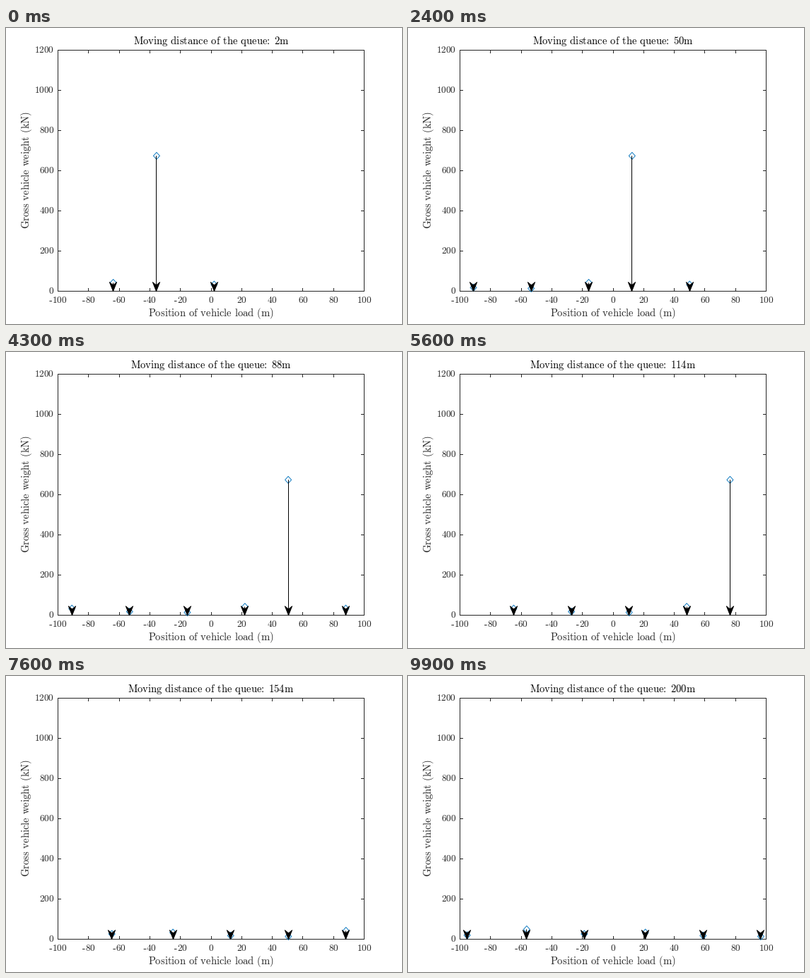
Animation of 560 by 420 pixels, one loop 10 s. Source, as a matplotlib script:

```python
import matplotlib.pyplot as plt
import numpy as np
from matplotlib.animation import FuncAnimation
from matplotlib.collections import LineCollection, PolyCollection

W, H, DPI = 560, 420, 100
FRAMES, STEP = 100, 2
LEFT, RIGHT, TOP, BOTTOM = 73.5, 506.5, 31.5, 373.5
INK, BLUE = "#262626", "#0072BD"
TICK_PX, LABEL_PX = 13.33, 14.67

# distance behind the head of the queue (m), gross weight (kN)
QUEUE = np.array([
    (0, 33), (37.6, 674), (65.9, 42), (103.5, 14), (141.2, 18),
    (178.9, 33), (218.8, 26), (256.4, 49), (295.3, 20),
])
DIAMOND = np.array([(0, -5), (4.5, 0), (0, 5), (-4.5, 0)])
HEAD = np.array([(0, 0.3), (-5.2, -12.9), (0, -8.7), (5.2, -12.9)])

plt.rcParams["mathtext.fontset"] = "cm"
plt.rcParams["path.snap"] = False


def px(size):
    return size * 72 / DPI


def sx(pos):
    return LEFT + (pos + 100) * (RIGHT - LEFT) / 200


def sy(weight):
    return BOTTOM - weight * (BOTTOM - TOP) / 1200


def mid(v):
    """Centre of the pixel that holds v."""
    return np.floor(v) + 0.5


def roman(s):
    # the colon carries relation spacing, which is taken back here
    s = s.replace(": ", r"\hspace{-0.2}:\hspace{0.306}")
    s = s.replace(" ", r"\hspace{0.38}")
    return r"$\mathrm{" + s + "}$"


fig = plt.figure(figsize=(W / DPI, H / DPI), dpi=DPI, facecolor="white")
ax = fig.add_axes([0, 0, 1, 1])
ax.set(xlim=(0, W), ylim=(H, 0))
ax.axis("off")


def label(x, y, s, size=LABEL_PX, color=INK, ha="center", rotation=0):
    return ax.text(x, y, roman(s), fontsize=px(size), color=color, ha=ha,
                   va="baseline", rotation=rotation, rotation_mode="anchor")


def line(xs, ys):
    ax.plot(xs, ys, color=INK, lw=px(1), solid_capstyle="butt")


def x_label(value):
    x, base = sx(value), 389.9
    if value < 0:
        digits = str(-value)
        start = x - (0.333 + 0.5 * len(digits)) * TICK_PX / 2
        x += 0.167 * TICK_PX
        dash = start + np.array([0.011, 0.276]) * TICK_PX
        line(dash, [mid(base - 0.216 * TICK_PX)] * 2)
    label(x, base, str(abs(value)), TICK_PX)


ax.add_patch(plt.Rectangle((LEFT, TOP), RIGHT - LEFT, BOTTOM - TOP,
                           fill=False, ec=INK, lw=px(1), zorder=2))
for v in range(-100, 101, 20):
    x = mid(sx(v))
    line([x, x], [BOTTOM, BOTTOM - 4.5])
    line([x, x], [TOP, TOP + 4.5])
    x_label(v)
for v in range(0, 1201, 200):
    y = mid(sy(v))
    line([LEFT, LEFT + 4.5], [y, y])
    line([RIGHT, RIGHT - 4.5], [y, y])
    label(68.3, sy(v) + 3.4, str(v), TICK_PX, ha="right")

label(290, 409.3, "Position of vehicle load (m)")
label(32.8, 201.5, "Gross vehicle weight (kN)", rotation=90)
title = label(290, 23.3, "", color="black")

marks = PolyCollection([], facecolors="none", edgecolors=BLUE,
                       linewidths=px(0.9), zorder=3)
stems = LineCollection([], colors="black", linewidths=px(1), zorder=4)
heads = PolyCollection([], facecolors="black", edgecolors="black",
                       linewidths=px(0.8), joinstyle="round", zorder=5)
for group in (marks, stems, heads):
    ax.add_collection(group, autolim=False)


def update(i):
    dist = STEP * (i + 1)
    title.set_text(roman(f"Moving distance of the queue: {dist}m"))
    pos = dist - QUEUE[:, 0]
    seen = np.abs(pos) <= 100
    xs, ys = sx(pos[seen]), sy(QUEUE[seen, 1])
    cols = mid(xs)
    marks.set_verts([DIAMOND + (x, y) for x, y in zip(xs, ys)])
    stems.set_segments([[(x, y), (x, BOTTOM)] for x, y in zip(cols, ys)])
    heads.set_verts([HEAD + (x, BOTTOM) for x in cols])
    return title, marks, stems, heads


anim = FuncAnimation(fig, update, frames=FRAMES, interval=100,
                     repeat=True, repeat_delay=0)
plt.show()
```
